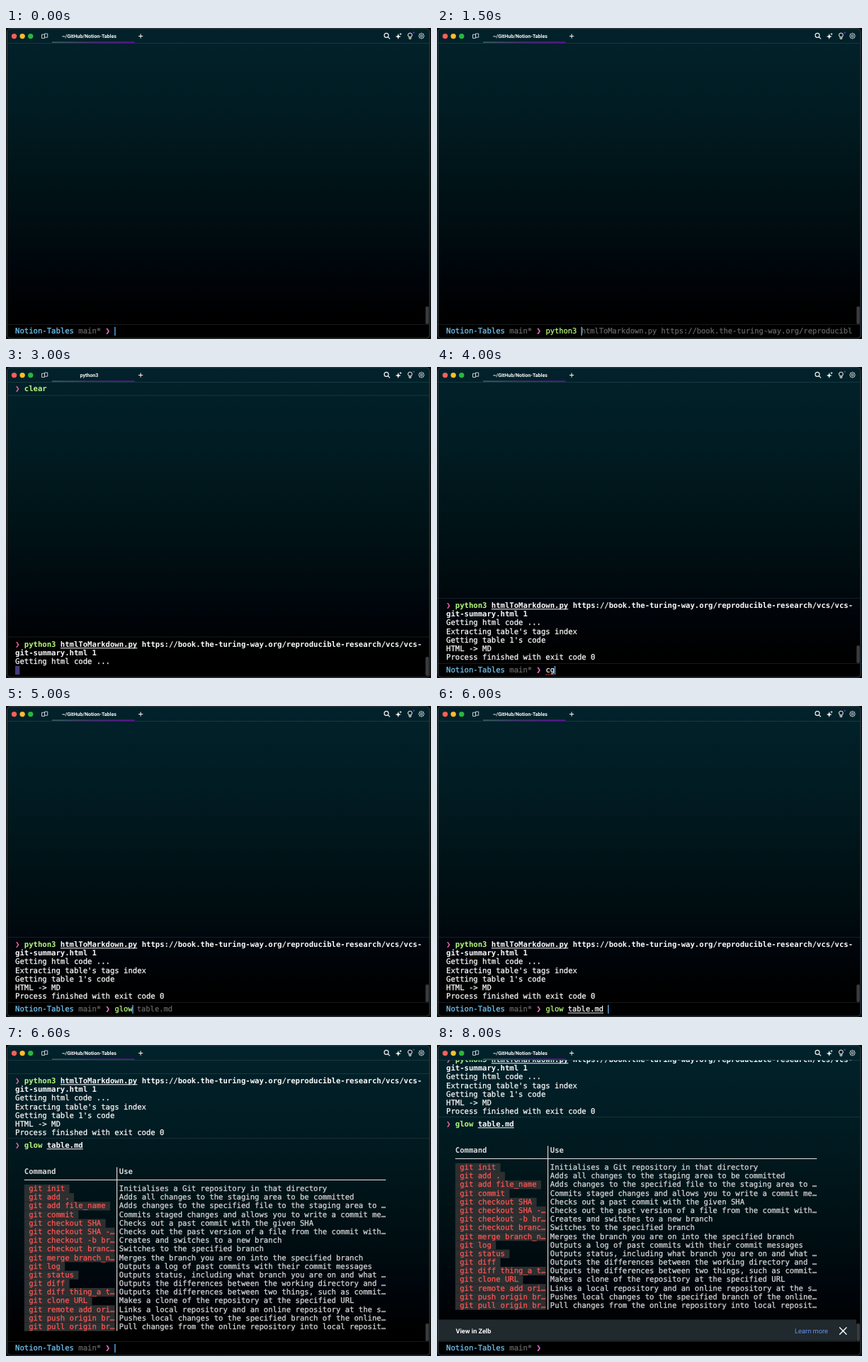
An HTML page with a canvas that plays this animation: 600 by 439 pixels, repeating every 8200 ms.

```html
<!DOCTYPE html>
<html lang="en">
<head>
<meta charset="utf-8">
<title>Terminal session</title>
<style>
html, body { margin: 0; width: 100%; height: 100%; overflow: hidden; background: #000; }
canvas { display: block; }
</style>
</head>
<body>
<canvas id="stage" width="600" height="439"></canvas>
<script>
const ctx = document.getElementById('stage').getContext('2d');
const LOOP = 8200;
const LEFT = 13, CELL = 6.381, ROW = 12.17, SIZE = 10.6;
const INPUT_X = 153.4, INPUT_CELL = 6.28, INPUT_SIZE = INPUT_CELL / 0.602, INPUT_COLS = 69;
const MONO = '"DejaVu Sans Mono", monospace', UI = 'Roboto, sans-serif';
const WHITE = '#fbfbfb', GREEN = '#b8fb7c', GRAY = '#666', BLUE = '#72c6f3';
const PINK = '#ff6aa6', MAGENTA = '#ee70d0', RED = '#ff5454', PALE = '#d8d8d8';
const RULE = 'rgba(190,210,220,0.12)';

const URL_HEAD = 'https://book.the-turing-way.org/reproducible-research/vcs/vcs-';
const URL_TAIL = 'git-summary.html 1';
const SCRIPT = 'htmlToMarkdown.py';
const COMMAND = `python3 ${SCRIPT} ${URL_HEAD}${URL_TAIL}`;
const OUTPUT = ['Getting html code ...', "Extracting table's tags index",
  "Getting table 1's code", 'HTML -> MD', 'Process finished with exit code 0'];

const TABLE = [
  ['git init', 'Initialises a Git repository in that directory'],
  ['git add .', 'Adds all changes to the staging area to be committed'],
  ['git add file_name', 'Adds changes to the specified file to the staging area to …'],
  ['git commit', 'Commits staged changes and allows you to write a commit me…'],
  ['git checkout SHA', 'Checks out a past commit with the given SHA'],
  ['git checkout SHA -…', 'Checks out the past version of a file from the commit with…'],
  ['git checkout -b br…', 'Creates and switches to a new branch'],
  ['git checkout branc…', 'Switches to the specified branch'],
  ['git merge branch_n…', 'Merges the branch you are on into the specified branch'],
  ['git log', 'Outputs a log of past commits with their commit messages'],
  ['git status', 'Outputs status, including what branch you are on and what …'],
  ['git diff', 'Outputs the differences between the working directory and …'],
  ['git diff thing_a t…', 'Outputs the differences between two things, such as commit…'],
  ['git clone URL', 'Makes a clone of the repository at the specified URL'],
  ['git remote add ori…', 'Links a local repository and an online repository at the s…'],
  ['git push origin br…', 'Pushes local changes to the specified branch of the online…'],
  ['git pull origin br…', 'Pull changes from the online repository into local reposit…']
];

// Each entry: start time, typed text, colour of the first word, suggestion
const TYPING = [
  [0, ''], [100, 'cl'], [200, 'clea'], [500, 'clear', GREEN], [600, ''],
  [800, 'p'], [900, 'py'], [1000, 'pyt'], [1100, 'pyth'],
  [1200, 'python', WHITE, COMMAND], [1400, 'python3', GREEN, COMMAND],
  [1500, 'python3 ', GREEN, COMMAND], [1900, COMMAND, GREEN], [2000, ''],
  [3800, 'c'], [4000, 'cg', WHITE, '', true], [4100, 'c'], [4200, ''],
  [4400, 'g'], [4500, 'gl'], [4600, 'glo'],
  [4800, 'glow', WHITE, 'glow table.md'], [5000, 'glow', GREEN, 'glow table.md'],
  [5200, 'glow ', GREEN, 'glow table.md'], [5600, 'glow t', GREEN, 'glow table.md'],
  [5800, 'glow tab', GREEN, 'glow table.md'], [5900, 'glow table.md', GREEN],
  [6000, 'glow table.md ', GREEN], [6200, '']
];
const PATH = '~/GitHub/Notion-Tables';
const TITLES = [[0, PATH], [600, 'clear'], [700, PATH], [2000, 'python3'],
  [3300, PATH], [6200, 'glow'], [6600, PATH]];
const LINES = [[0, 0], [2500, 1], [3100, 2], [3200, 4], [3300, 5]];

const at = (list, t) => list.filter(e => e[0] <= t).pop();

function rect(x, y, w, h, color) {
  ctx.fillStyle = color;
  ctx.fillRect(x, y, w, h);
}

function text(str, x, y, color, font) {
  ctx.font = font;
  ctx.fillStyle = color;
  ctx.fillText(str, x, y);
}

// Regular weight gets a hairline outline to look a little heavier
function mono(str, x, y, color, bold, size = SIZE) {
  y = Math.round(y);
  text(str, x, y, color, `${bold ? 'bold ' : ''}${size}px ${MONO}`);
  if (bold) return;
  ctx.strokeStyle = color;
  ctx.lineWidth = 0.25;
  ctx.strokeText(str, x, y);
}

function stroke(points, color, width) {
  ctx.strokeStyle = color;
  ctx.lineWidth = width;
  ctx.beginPath();
  points.forEach(([x, y], i) => i ? ctx.lineTo(x, y) : ctx.moveTo(x, y));
  ctx.stroke();
}

function disc(x, y, r, color) {
  ctx.fillStyle = color;
  ctx.beginPath();
  ctx.arc(x, y, r, 0, Math.PI * 2);
  ctx.fill();
}

function ring(x, y, r, width) {
  ctx.strokeStyle = WHITE;
  ctx.lineWidth = width;
  ctx.beginPath();
  ctx.arc(x, y, r, 0, Math.PI * 2);
  ctx.stroke();
}

function box(x, y, w, h, r, color) {
  ctx.beginPath();
  ctx.roundRect(x, y, w, h, r);
  ctx.fillStyle = color;
  ctx.fill();
}

function background() {
  const g = ctx.createLinearGradient(0, 0, 0, 439);
  [[0, '#02222b'], [0.25, '#011c23'], [0.5, '#001317'], [0.7, '#000a0f'],
   [0.76, '#00060d'], [0.92, '#000000'], [1, '#000000']].forEach(s => g.addColorStop(...s));
  rect(0, 0, 600, 439, '#0b0d0e');
  box(1, 1, 597, 437, 5, g);
}

function header(title) {
  rect(2, 21, 596, 1, 'rgba(130,180,190,0.16)');
  ['#ff5f57', '#febc2e', '#28b83e'].forEach((c, i) => disc(11.5 + i * 11.6, 11.6, 3.7, c));

  ctx.strokeStyle = '#d8dee0';
  ctx.lineWidth = 0.9;
  ctx.strokeRect(50.5, 9.2, 4, 5.2);
  ctx.strokeRect(54.5, 8, 4.2, 5.2);

  const g = ctx.createLinearGradient(65, 0, 181, 0);
  g.addColorStop(0, '#3d6a62');
  g.addColorStop(0.45, '#54307c');
  g.addColorStop(1, '#7a08b4');
  rect(65, 19.4, 116.5, 1.4, g);

  ctx.textAlign = 'center';
  text(title, 117.4, 13.6, WHITE, `bold 7.1px ${UI}`);
  ctx.textAlign = 'left';
  stroke([[187, 11.5], [193.2, 11.5]], WHITE, 1);
  stroke([[190.1, 8.4], [190.1, 14.6]], WHITE, 1);
  toolIcons();
}

function toolIcons() {
  ring(537, 10.4, 3, 1.1);
  stroke([[539.2, 12.6], [542, 15.4]], WHITE, 1.2);

  [[553.7, 12, 4], [557, 8.6, 2]].forEach(([x, y, r]) => {
    ctx.fillStyle = WHITE;
    ctx.beginPath();
    for (let i = 0; i < 8; i++) {
      const a = i * Math.PI / 4, d = i % 2 ? r * 0.36 : r;
      ctx.lineTo(x + d * Math.cos(a), y + d * Math.sin(a));
    }
    ctx.fill();
  });

  ring(570.4, 10, 2.9, 1);
  stroke([[569.2, 12.8], [569.2, 15.3], [571.6, 15.3], [571.6, 12.8]], WHITE, 1);
  disc(575.6, 6.6, 1.2, '#5a3fa8');

  ctx.strokeStyle = WHITE;
  ctx.lineWidth = 0.9;
  ctx.beginPath();
  for (let i = 0; i <= 48; i++) {
    const a = i * Math.PI / 24, d = 3.5 + 0.5 * Math.cos(8 * a);
    ctx.lineTo(586.5 + d * Math.cos(a), 11.2 + d * Math.sin(a));
  }
  ctx.stroke();
  ring(586.5, 11.2, 1.4, 0.9);
}

// A row is a list of cells: [column, text, colour, bold, underlined]
const commandRow = (name, file, rest = '') => [
  [0, '❯', PINK, true],
  [2, name, GREEN, true],
  [3 + name.length, file, WHITE, true, true],
  [4 + name.length + file.length, rest, WHITE, true]
];
const pythonRows = count => [
  commandRow('python3', SCRIPT, URL_HEAD),
  [[0, URL_TAIL, WHITE, true]],
  ...OUTPUT.slice(0, count).map(s => [[0, s, WHITE]])
];
const glowRow = commandRow('glow', 'table.md');

function drawRow(row, y) {
  for (const [col, str, color, bold, line] of row) {
    const x = LEFT + col * CELL;
    mono(str, x, y, color, bold);
    if (line) rect(x, Math.round(y) + 1.3, str.length * CELL, 1, color);
  }
}

function drawTable(top) {
  const bar = LEFT + 22.5 * CELL, start = LEFT + 2 * CELL;
  drawRow([[2, 'Command', PALE, true], [23, 'Use', PALE, true]], top);
  TABLE.forEach(([code, use], i) => {
    const y = top + (i + 2) * ROW;
    const cols = Math.min(code.length + 2, 20);
    rect(start, y - 9.2, cols * CELL, ROW, '#2d2f30');
    drawRow([[3, code, RED], [23, use, PALE]], y);
  });
  rect(bar - 0.6, top - 9.4, 1.2, ROW * 19, PALE);
  rect(start, top + 8.1, 80 * CELL, 1.1, PALE);
}

// Stacks blocks upwards from the given bottom edge
function drawBlocks(blocks, bottom) {
  ctx.save();
  ctx.beginPath();
  ctx.rect(0, 21.5, 600, 418);
  ctx.clip();
  for (const { rows, pad = 0, table } of blocks.reverse()) {
    const first = bottom - 4.6 - (rows.length + pad - 1) * ROW;
    rows.forEach((row, i) => drawRow(row, first + i * ROW));
    if (table) drawTable(first + 3 * ROW);
    bottom = first - 13.6;
    rect(2, bottom - 0.5, 596, 1, RULE);
  }
  ctx.restore();
}

function drawInput([, typed, color = WHITE, hint = '', wrong], showCursor) {
  const wrapped = typed.length > INPUT_COLS;
  const y = 431.4 - (wrapped ? ROW : 0);
  const put = (str, col, c) => mono(str, INPUT_X + col * INPUT_CELL, y, c, false, INPUT_SIZE);
  rect(2, y - 13.4, 596, 1, RULE);
  drawRow([[0, 'Notion-Tables', BLUE], [14, 'main*', GRAY], [20, '❯', MAGENTA]], y);

  const name = typed.split(' ')[0];
  put(name, 0, color);
  put(typed.slice(name.length, INPUT_COLS), name.length, WHITE);
  put(hint.slice(typed.length, INPUT_COLS), typed.length, GRAY);

  const file = typed.split(' ')[1];
  if (wrapped || file === 'table.md') {
    rect(INPUT_X + (name.length + 1) * INPUT_CELL, y + 1.4, file.length * INPUT_CELL, 0.9, WHITE);
  }
  if (wrong) {
    ctx.setLineDash([2, 1.2]);
    stroke([[INPUT_X, y + 3], [INPUT_X + typed.length * INPUT_CELL, y + 3]], '#e0484c', 1);
    ctx.setLineDash([]);
  }

  let cx = INPUT_X + typed.length * INPUT_CELL, cy = y;
  if (wrapped) {
    const tail = typed.slice(INPUT_COLS);
    cy += ROW;
    cx = LEFT + tail.length * INPUT_CELL;
    mono(tail, LEFT, cy, WHITE, false, INPUT_SIZE);
  }
  if (showCursor) rect(cx - 0.2, cy - 9.4, 1.4, 12.2, '#5ba8e8');
  return y - 13.4;
}

function drawToast() {
  rect(2, 387.6, 590, 30.2, '#20292d');
  text('View in Zelb', 26.5, 406.6, WHITE, `bold 9.1px ${UI}`);
  text('Learn more', 505, 406.6, '#6690f2', `9.3px ${UI}`);
  stroke([[568.2, 398.6], [578.4, 408.8]], WHITE, 1.4);
  stroke([[578.4, 398.6], [568.2, 408.8]], WHITE, 1.4);
}

function draw(t) {
  const python = t >= 2000 && t < 3300, glow = t >= 6200 && t < 6600;
  const running = python || glow, toast = t >= 6700;
  const blocks = [];
  background();

  if (t >= 2000) blocks.push({ rows: pythonRows(at(LINES, t)[1]), pad: python ? 1 : 0 });
  if (t >= 6200) blocks.push({ rows: [glowRow], pad: glow ? 1 : 22, table: !glow });
  drawBlocks(blocks, running ? 435.75 : toast ? 387.65 : 417.65);

  let floor = 436.5;
  if (running) {
    drawRow([[0, '❯', PINK, true], [2, 'clear', GREEN, true]], 34.4);
    rect(2, 39.6, 596, 1, RULE);
    if (python) rect(LEFT, 422, 6.3, 12.3, '#443a78');
  } else {
    if (toast) drawToast();
    floor = drawInput(at(TYPING, t), t < 8000);
  }
  box(592.3, floor - (running ? 27.5 : 25), 4.6, running ? 27 : 25, 2, '#393b3c');

  header(at(TITLES, t)[1]);
  ctx.strokeStyle = '#3b4245';
  ctx.lineWidth = 1;
  ctx.beginPath();
  ctx.roundRect(1.5, 0.8, 596.5, 437.2, 5);
  ctx.stroke();
}

ctx.textRendering = 'geometricPrecision';
ctx.lineJoin = 'round';
const begin = performance.now();
function tick() {
  draw((performance.now() - begin) % LOOP);
  requestAnimationFrame(tick);
}
tick();
</script>
</body>
</html>
```
